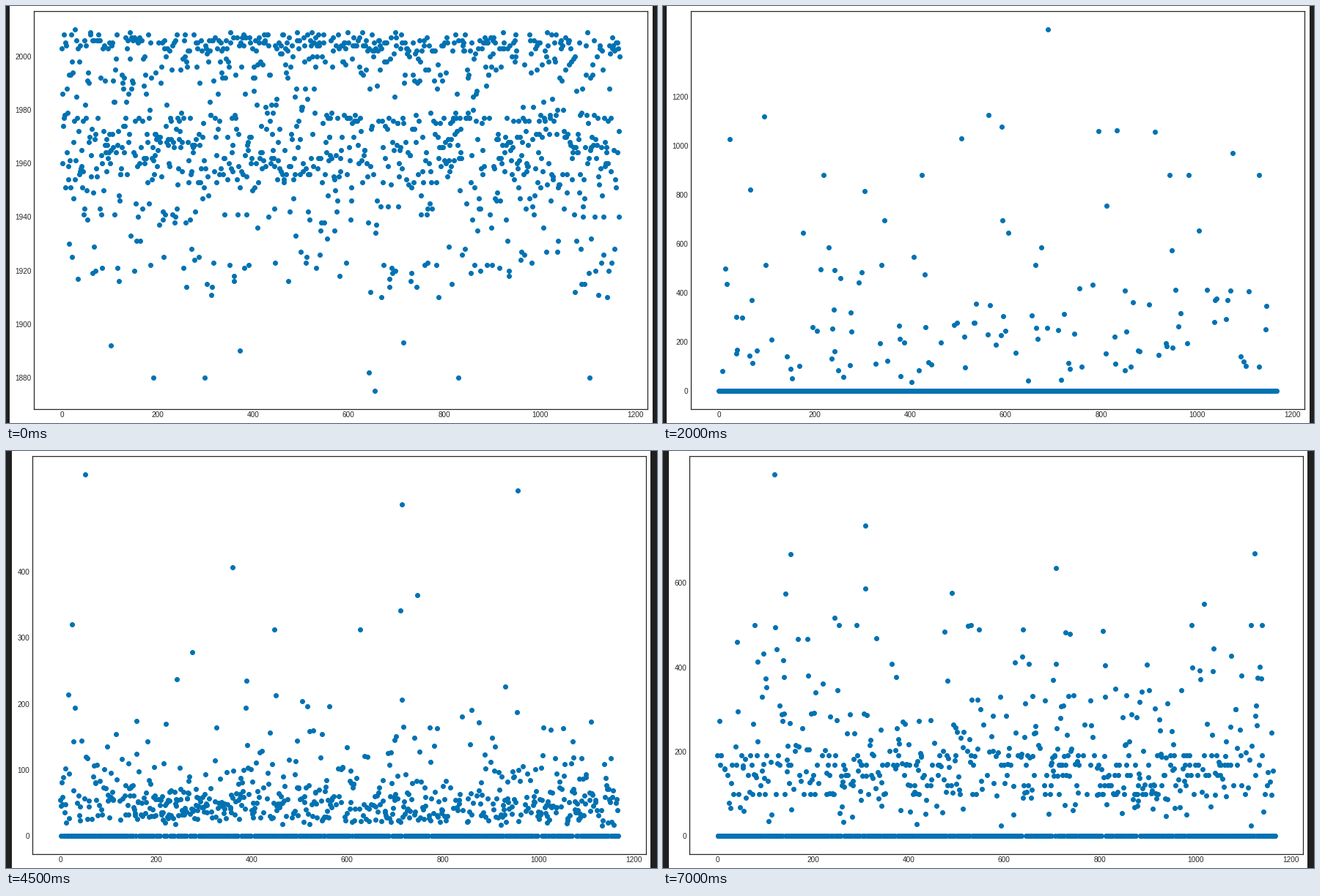
Write a matplotlib script that moves like this. It is 888 px wide and 570 px high and loops after 8000 ms.

```python
import numpy as np
import matplotlib.pyplot as plt
from matplotlib.animation import FuncAnimation
from matplotlib.patches import Rectangle

W, H, DPI = 888, 570, 72
BOTTOM, PLOT_W, PLOT_H = 19, 837, 543.6
N = 1168
INK, BLUE, DARK = "#262626", "#0072b2", "#202020"

plt.rcParams["font.family"] = "Liberation Sans"
plt.rcParams["font.size"] = 10


def padded(lo, hi):
    pad = 0.05 * (hi - lo)
    return lo - pad, hi + pad


def sparse(rng, count, draw):
    """Zeros everywhere except for a random subset of samples."""
    values = np.zeros(N)
    values[rng.choice(N, count, replace=False)] = draw(count)
    return values


def years(rng):
    """Whole years from a few building booms: share, middle, spread."""
    booms = np.array([
        (0.23, 2005, 2), (0.13, 1996, 4.5), (0.05, 1985, 5), (0.07, 1977, 1),
        (0.20, 1967, 5), (0.16, 1956, 4), (0.07, 1943, 5), (0.09, 1922, 7),
    ])
    share, middle, spread = booms.T
    pick = rng.choice(len(booms), N, p=share)
    return np.clip(np.round(rng.normal(middle[pick], spread[pick])), 1910, 2009)


def rare(rng):
    return sparse(rng, 128, lambda n: np.clip(30 + rng.gamma(1.6, 180, n), 30, 880))


def small(rng):
    def draw(n):
        return np.minimum(12 + rng.lognormal(np.log(45), 0.8, n), rng.uniform(190, 300, n))
    return sparse(rng, 620, draw)


def large(rng):
    def draw(n):
        common = rng.choice([100, 120, 144, 168, 192], n)
        spread = np.clip(rng.gamma(3.5, 58, n), 25, 500)
        return np.where(rng.random(n) < 0.35, common, spread)
    return sparse(rng, 560, draw)


def make_view(seed, source, extremes, span, step, left, page):
    """One scatter plot; extremes are the samples that stand out."""
    values = source(np.random.default_rng(seed))
    for x, y in extremes:
        values[x] = y
    points = np.column_stack([np.arange(N), values])
    first = -(-span[0] // step) * step
    ticks = range(first, span[1] - step // 2 + 1, step)
    return dict(points=points, ylim=padded(*span), ticks=ticks, left=left, page=page)


VIEWS = [
    make_view(3, years, [(28, 2010), (103, 1892), (192, 1880), (299, 1880), (373, 1890),
                         (643, 1882), (655, 1875), (714, 1893), (830, 1880), (1104, 1880)],
              (1875, 2010), 20, 38, (5, 882)),
    make_view(5, rare, [(23, 1028), (95, 1120), (508, 1030), (564, 1126), (592, 1078),
                        (688, 1474), (795, 1060), (833, 1063), (912, 1057), (1075, 970)],
              (0, 1474), 200, 38, (5, 882)),
    make_view(7, small, [(24, 320), (52, 547), (361, 406), (448, 312), (627, 312),
                         (711, 341), (714, 502), (747, 364), (957, 523)],
              (0, 547), 100, 36, (8, 879)),
    make_view(9, large, [(119, 857), (142, 574), (153, 668), (245, 517), (309, 736),
                         (310, 586), (490, 576), (708, 635), (1018, 550), (1124, 670)],
              (0, 857), 200, 36, (8, 879)),
]

fig = plt.figure(figsize=(W / DPI, H / DPI), dpi=DPI, facecolor=DARK)
page = fig.add_artist(Rectangle((0, 0), 1, 1, color="white", lw=0, zorder=-1,
                                transform=fig.transFigure))
ax = fig.add_axes([0, 0, 1, 1])
ax.tick_params(length=0, pad=3.5, labelcolor=INK)
for spine in ax.spines.values():
    spine.set(color=INK, linewidth=1.25)
dots = ax.scatter(np.arange(N), np.zeros(N), s=36, color=BLUE, linewidths=1)


def show(frame):
    view = VIEWS[(frame + 4) // 5]  # the first view lasts one step, the others five
    x0, x1 = view["page"]
    page.set(x=x0 / W, width=(x1 - x0) / W)
    ax.set_position([view["left"] / W, BOTTOM / H, PLOT_W / W, PLOT_H / H])
    dots.set_offsets(view["points"])
    ax.set_xticks(range(0, 1201, 200))
    ax.set_yticks(view["ticks"])
    ax.set_xlim(padded(0, N - 1))
    ax.set_ylim(view["ylim"])
    return [dots]


anim = FuncAnimation(fig, show, frames=16, interval=500, init_func=lambda: show(0),
                     repeat=True, repeat_delay=0, blit=False)
plt.show()
```
